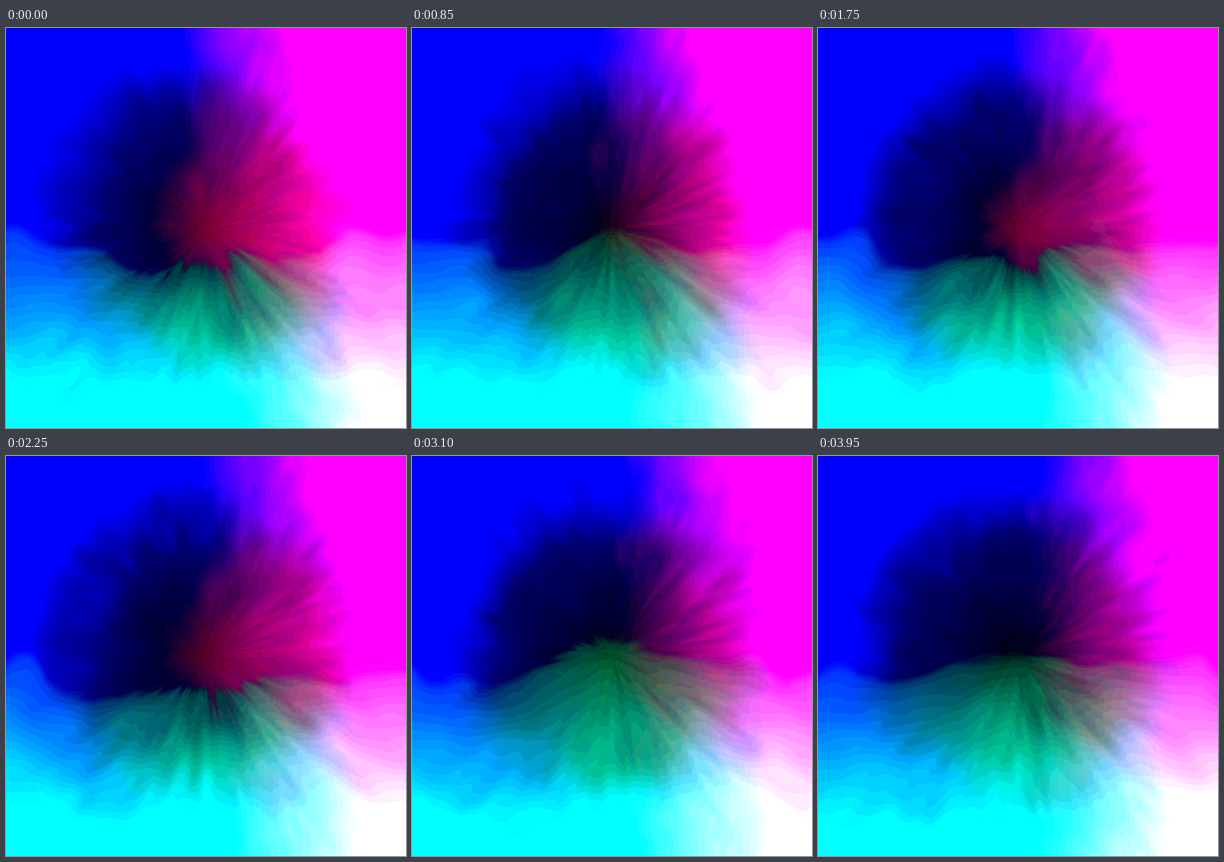
An HTML page with a canvas that plays this animation: 400 px wide and 400 px high, repeating every 4 s.

```html
<!DOCTYPE html>
<html lang="en">
<head>
<meta charset="utf-8">
<title>Colour burst</title>
<style>
  html, body { margin: 0; width: 100%; height: 100%; overflow: hidden; background: #00f; }
  canvas { display: block; width: 100vw; height: 100vh; }
</style>
</head>
<body>
<canvas id="stage" width="400" height="400"></canvas>
<script>
const SIZE = 400, MID = 200, LOOP = 4000, STEP = 50;
const COLS = 128, ROWS = 64;
const ctx = document.getElementById('stage').getContext('2d');
const image = ctx.createImageData(SIZE, SIZE);
const data = image.data;

// Height of the green horizon at the core: [seconds, pixels below its rest]
const PULSE = [[0, 32], [.45, 12], [1.25, -32], [1.75, 38], [2.25, 34], [3.1, -30], [3.95, -12]];

let seed = 71;
const random = () => (seed = seed * 16807 % 2147483647) / 2147483647;
const lattice = Float32Array.from({ length: COLS * ROWS }, random);

const clamp = (value, low = 0, high = 1) => Math.min(high, Math.max(low, value));
const ease = f => f * f * (3 - 2 * f);
const mix = (a, b, f) => a + (b - a) * f;
const snap = (value, step) => Math.round(value / step) * step;
const bell = (d, width) => Math.exp(-((d / width) ** 2));

function pulse(time) {
  const next = PULSE.findIndex(([t]) => t > time);
  if (next === 0) return PULSE[0][1];
  if (next < 0) return PULSE[PULSE.length - 1][1];
  const [t0, a] = PULSE[next - 1], [t1, b] = PULSE[next];
  return mix(a, b, ease((time - t0) / (t1 - t0)));
}

// Smooth noise in -0.5..0.5, periodic around the circle
function noise(turn, depth, cells) {
  const u = turn * cells, iu = Math.floor(u), iv = Math.floor(depth);
  const fu = ease(u - iu), fv = ease(depth - iv);
  const a = iu % cells, b = (iu + 1) % cells;
  const top = (iv & (ROWS - 1)) * COLS, low = (iv + 1 & (ROWS - 1)) * COLS;
  return mix(
    mix(lattice[top + a], lattice[top + b], fu),
    mix(lattice[low + a], lattice[low + b], fu), fv) - .5;
}

const polar = new Float32Array(SIZE * SIZE * 4);
for (let y = 0, k = 0; y < SIZE; y++) {
  for (let x = 0; x < SIZE; x++, k += 4) {
    const dx = x + .5 - MID, dy = y + .5 - MID, r = Math.hypot(dx, dy);
    polar.set([r, Math.atan2(dy, dx) / (2 * Math.PI) + .5, dx / r, dy / r], k);
  }
}

function draw(time) {
  // The core's pulse reaches each ring a little later
  const rings = Array.from({ length: 340 }, (_, r) => pulse(time - r / 300) * bell(r, 75));
  const drift = time * 9;

  for (let k = 0; k < data.length; k += 4) {
    const r = polar[k], turn = polar[k + 1], cos = polar[k + 2], sin = polar[k + 3];
    const amount = Math.min(1, r / 60);
    const broad = noise(turn, r / 45 - time * 1.1 + 20, 13);
    const swirl = noise(turn, r / 38 - time * 1.2 + 41, 19);
    const streak = noise(turn, r / 36 - time * 1.5 + 9, 64);
    const fine = noise(turn, r / 22 - time * 2.5 + 30, 128);

    // Pull the smooth colour field along the outward flow
    const out = amount * (broad * 26 + streak * 18 + fine * 12);
    const side = amount * (swirl * 32 + streak * 8);
    const x = MID + cos * (r + out) - sin * side;
    const y = MID + sin * (r + out) + cos * side;
    const reach = Math.hypot(x - MID, y - MID);

    const ring = rings[Math.min(339, Math.floor(reach))];
    const below = y - 206 - ring - 18 * bell(x - 100, 50);
    const lower = ease(clamp((y - 205) / 70));
    const upper = 1 - lower;

    const start = 178 + upper * drift + lower * 50;
    const width = mix(95 + clamp(y, 0, 150) * .3, 120, lower);
    let red = (x - start) / width * 255;
    red += 2.4 * Math.max(0, ring) * clamp(1 - below / 12);
    let green = 42 * ease(clamp(below / 14)) + below * 1.5;

    red = clamp(snap(red, 15) + fine * 18, 0, 255);
    green = clamp(snap(green, 15) + streak * 14, 0, 255);
    const blue = 18 + reach * .78 + Math.max(0, reach - 110) * 1.7
      + Math.max(red, green) * .26;

    data[k] = red;
    data[k + 1] = green;
    data[k + 2] = snap(blue, 10) - fine * 18;
    data[k + 3] = 255;
  }
  ctx.putImageData(image, 0, 0);
}

let shown = -1;
const begin = performance.now();
function tick() {
  const step = Math.floor((performance.now() - begin) % LOOP / STEP);
  if (step !== shown) {
    shown = step;
    draw(step * STEP / 1000);
  }
  requestAnimationFrame(tick);
}
tick();
</script>
</body>
</html>
```
